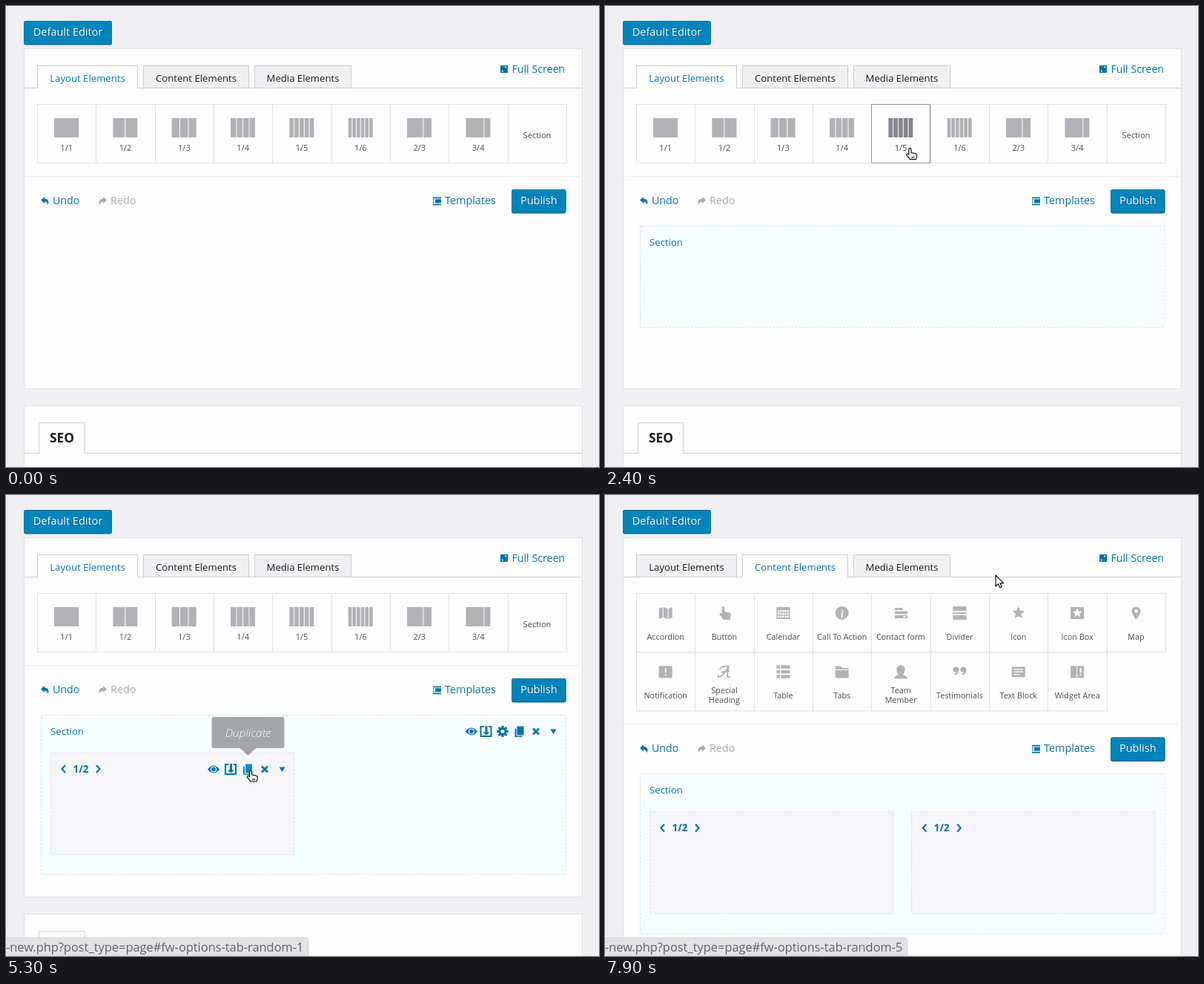
These frames come from a looping animation (800 px wide and 621 px high, 8000 ms). An HTML page:

```html
<!DOCTYPE html>
<html lang="en">
<head>
<meta charset="utf-8">
<title>Page builder</title>
<style>
  html, body { margin: 0; width: 100%; height: 100%; overflow: hidden; background: #f0eff1; }
  svg { display: block; width: 800px; height: 621px; font-family: "Open Sans", "Noto Sans", sans-serif; }
  .link { fill: #0073aa; }
  .mid { text-anchor: middle; }
  .button text { fill: #fff; text-anchor: middle; stroke: #006799; stroke-width: 1.6px; stroke-opacity: .7; paint-order: stroke; }
  .tile { --icon: #b2b1b4; --label: #4b4a4d; --hole: #fefdff; }
  .tile.on { --icon: #878688; --label: #333234; }
  .icon { fill: var(--icon); }
  .hole { fill: var(--hole); }
  .script { fill: none; stroke: var(--icon); stroke-width: 2px; }
  .label { fill: var(--label); text-anchor: middle; }
  .tab rect { fill: #f0eff1; stroke: #cbcacc; }
  .tab text { fill: #1b1a1c; }
  .tab path { stroke: none; }
  .tab.on rect { fill: #fefdff; }
  .tab.on text { fill: #0073aa; }
  .tab.on path { stroke: #fefdff; }
  .tip text { fill: #fff; font-style: italic; font-weight: 300; text-anchor: middle; }
  .dash { stroke: #d9dee1; stroke-dasharray: 3 2; }
</style>
</head>
<body>
<svg id="stage" viewBox="0 0 800 621"></svg>
<script>
const PANEL = '#fefdff', EDGE = '#e0dfe2', LOOP = 8000, STEP = 100, PITCH = 79.4;
const stage = document.getElementById('stage');

const rect = (x, y, w, h, attrs = '') => `<rect x="${x}" y="${y}" width="${w}" height="${h}" ${attrs}/>`;
const path = (d, attrs = '') => `<path d="${d}" ${attrs}/>`;
const text = (x, y, s, size, attrs = '') => `<text x="${x}" y="${y}" font-size="${size}" ${attrs}>${s}</text>`;
const group = (attrs, ...kids) => `<g ${attrs}>${kids.join('')}</g>`;
const at = (x, y, ...kids) => group(`transform="translate(${x} ${y})"`, ...kids);
const range = n => [...Array(n).keys()];

const STAR = range(10).map(i => {
  const r = i % 2 ? 4 : 9, a = i * Math.PI / 5;
  return `${i ? 'L' : 'M'}${(r * Math.sin(a)).toFixed(1)} ${(-r * Math.cos(a)).toFixed(1)}`;
}).join('') + 'z';
const HAND = 'M-1.6 1.6a1.6 1.6 0 0 1 3.2 0V6l5 .9q3 .6 2.7 3.1l-1 5h-8l-5-6q.2-2 2.1-1.4l1 .9z';
const ARROW = 'M0 0v15l3.5-3.3 2.2 5 2.5-1-2.2-4.9h4.7z';
const REPLY = 'M0 4.500L5 0v2.700q5.500 0 5.500 4.800 0 1.800-1.500 3.500 .3-4.600-4-4.600V9z';

const button = (x, y, w, s) => group('class="button"',
  rect(x, y, w, 32.5, 'rx="3" fill="#006799"'),
  rect(x + .5, y + .5, w - 1, 30.5, 'rx="2.500" fill="#0085ba" stroke="#0073aa"'),
  text(x + w / 2, y + 20, s, 14.5));

const tab = (id, x, w, s) => group(`id="${id}" class="tab"`,
  rect(x + .5, 80.5, w, 30), path(`M${x + 1} 110.5h${w - 1}`), text(x + w / 2 + .5, 101.5, s, 13.15, 'class="mid"'));

const tileX = i => Math.round(42 + 79.35 * i);
const frame = (i, y) => rect(tileX(i) + .5, y + .5, tileX(i + 1) - tileX(i), 79, `fill="none" stroke="${EDGE}"`);

// Column thumbnails, described by their relative widths
function layoutTile(parts, i) {
  const cx = 81.7 + 79.35 * i;
  if (!parts) return frame(i, 132) + text(cx, 177.5, 'Section', 11.1, 'class="label"');
  const sum = parts.reduce((a, b) => a + b), unit = (34 - parts.length) / sum;
  let left = cx - 16.7;
  const bars = parts.map(p => {
    const bar = rect(left.toFixed(2), 151, (p * unit).toFixed(2), 26, 'class="icon"');
    left += p * unit + 1;
    return bar;
  });
  const name = parts.length > 1 && parts[0] > 1 ? `${parts[0]}/${sum}` : `1/${sum}`;
  return frame(i, 132) + bars.join('') + text(cx, 194.5, name, 11.1, 'class="label"');
}
const layouts = [...range(6).map(n => Array(n + 1).fill(1)), [2, 1], [3, 1], null];

const rows = (x, w, h, ...ys) => ys.map(y => rect(x, y, w, h)).join('');
const hole = (...kids) => group('class="hole"', ...kids);
const quote = 'a4 4 0 1 1 8 0q0 6-6 7v-2q2.500-.5 3-2.300-5 1.300-5-2.700z';
const contents = [
  ['Accordion', path('M-9-6l5-2V6l-5 2zM-3-8l6 2V8l-6-2zM4-6l5-2V6l-5 2z')],
  ['Button', at(-1.5, -9, path(HAND, 'transform="scale(1.1 1.2)"'))],
  ['Calendar', rect(-9, -8, 18, 16) + hole(...range(15).map(i => rect(-7.5 + i % 5 * 3.2, -4 + (i / 5 | 0) * 3.8, 2.2, 2.6)))],
  ['Call To Action', '<circle r="9"/>' + hole(text(0, 5.5, 'i', 15, 'class="mid" font-family="Liberation Serif, serif" font-style="italic" font-weight="700"'))],
  ['Contact form', rows(-8, 10, 3, -7) + rows(-8, 17, 4, -2.5) + rows(-8, 17, 4, 3) + hole(rect(3, 4.2, 4, 1.5))],
  ['Divider', rows(-9, 18, 6, -9, 3) + rows(-9, 18, 2, -1)],
  ['Icon', path(STAR)],
  ['Icon Box', rect(-9, -8, 18, 16) + hole(path(STAR, 'transform="scale(.75)"'))],
  ['Map', path('M0 9Q-6 1-6-2.500a6 6 0 0 1 12 0Q6 1 0 9z') + hole('<circle cy="-2.5" r="2.4"/>')],
  ['Notification', rect(-9, -8, 18, 16) + hole(rect(-1, -5, 2, 6), rect(-1, 3, 2, 2))],
  ['Special Heading', path('M-8 4q-1 4 3 2 6-4 11-14-2 8-2 13 0 4 4 1M-4 1q5-3 11-2M-6-3q0-5 11-5', 'class="script"')],
  ['Table', rows(-9, 4.5, 4.5, -9, -2.5, 4) + rows(-3, 12, 4.5, -9, -2.5, 4)],
  ['Tabs', path('M-9-8h7l2 2.500h9v2H-9zM-9-2.500H9V8H-9z')],
  ['Team Member', path('M0-9c8 0 6 9 3 12 0 2 6 1.500 6 6H-9c0-4.500 6-4 6-6-3-3-5-12 3-12z')],
  ['Testimonials', path('M-9-3' + quote + 'M1-3' + quote)],
  ['Text Block', rect(-9, -7, 18, 14) + hole(rows(-6, 12, 1.3, -4, -.7), rows(-6, 8, 1.3, 2.6))],
  ['Widget Area', rect(-9, -8, 8, 16) + rect(0, -8, 9, 16) + hole(rect(3.3, -5, 2.4, 6), rect(3.3, 3, 2.4, 2))]
];
function contentTile([name, icon], i) {
  const row = i / 9 | 0, col = i % 9, y = 132 + row * PITCH, cx = 81.7 + 79.35 * col;
  const lines = i === 10 || i === 13 ? name.split(' ') : [name];
  return frame(col, y) + group('class="icon"', at(cx, y + 27, icon)) +
    lines.map((s, n) => text(cx, y + 62.5 + (lines.length > 1 ? n * 13 - 7 : 0), s, 10.8, 'class="label"')).join('');
}

// Controls in the headers of sections and columns
const tools = {
  eye: path('M-8 0Q0-10 8 0 0 10-8 0z') + '<circle r="4" fill="#f7fbfe"/><circle r="2.900"/>',
  load: path('M-2.500-6.500H-7v13H7v-13H3.500', 'fill="none" stroke="#0073aa" stroke-width="2"') + path('M-1-7.500h3v8.500h3L.5 5-4 1h3z'),
  gear: range(4).map(i => rect(-1.6, -7.5, 3.2, 15, `transform="rotate(${i * 45})"`)).join('') + '<circle r="5.500"/><circle r="2.500" fill="#f7fbfe"/>',
  copy: path('M-3-7H6V5H-3zM-6-4h2V6H4v1.500H-6z'),
  close: path('M-4-4L4 4M4-4L-4 4', 'stroke="#0073aa" stroke-width="2.600"'),
  caret: path('M-4-3H4L0 3.500z')
};
const toolbar = (id, y, places) => group(`id="${id}" class="link"`,
  ...Object.entries(places).map(([name, x]) => group(`class="${name}"`, at(x, y, tools[name]))));

const column = (id, x) => group(`id="${id}"`,
  rect(x + .5, 347.5, 328.5, 137, 'fill="#f6f5f7" class="dash"'),
  path(`M${x + 20} 364l-4.500 5 4.500 5M${x + 62} 364l4.500 5-4.500 5`, 'fill="none" stroke="#0073aa" stroke-width="2.200"'),
  text(x + 41, 374, '1/2', 13.5, 'class="link mid" font-weight="700"'));

const tip = (id, cx, y, w, s) => group(`id="${id}" class="tip"`,
  rect(cx - w / 2, y, w, 42, 'rx="3" fill="#2f2e30"'),
  path(`M${cx - 11} ${y + 42}h22l-11 10z`, 'fill="#2f2e30"'), text(cx, y + 27, s, 15.5));

stage.innerHTML = [
  button(24, 20, 119, 'Default Editor'),
  rect(24.5, 57.5, 753, 458, `id="panel" fill="${PANEL}" stroke="${EDGE}"`),
  path('M25 110.500H778', 'stroke="#cbcacc"'),
  tab('tabLayout', 42, 135, 'Layout Elements'),
  tab('tabContent', 185, 142, 'Content Elements'),
  tab('tabMedia', 335, 130, 'Media Elements'),
  at(667, 80, rect(0, 0, 10, 10, 'class="link"'), path('M2 6v2.500h2.500zM5.500 1.500H8V4z', `fill="${PANEL}"`)),
  text(682.5, 90, 'Full Screen', 14.2, 'class="link"'),
  group('id="layouts"', ...layouts.map((p, i) => group(`class="tile" id="tile${i}"`, layoutTile(p, i)))),
  group('id="contents" class="tile"', ...contents.map(contentTile)),
  rect(0, 132.5, 79, 79, 'id="halo" fill="none" stroke="#929193"'),
  group('id="work"',
    path('M25 229.500H778', 'stroke="#eeedf0"'),
    at(47, 257, path(REPLY, 'class="link"')), text(63, 267, 'Undo', 14.2, 'class="link"'),
    group('fill="#aaa9ab"', group('transform="translate(136 257) scale(-1 1)"', path(REPLY)), text(141, 267, 'Redo', 14.4)),
    group('class="link"', at(576, 257.5, rows(0, 11, 1.8, 0, 9), rows(0, 2, 1.5, 3, 6), rect(3, 2.8, 8, 5)),
      text(592, 267, 'Templates', 14.4)),
    button(682, 247, 73.5, 'Publish'),
    group('id="section"',
      rect(47.5, 296.5, 707.5, 136, 'id="box" fill="#f7fcff" class="dash"'),
      text(60, 323, 'Section', 13.2, 'class="link"'),
      toolbar('sectionTools', 318.5, { eye: 628, load: 647.5, gear: 670, copy: 692.5, close: 715, caret: 738.5 }),
      rect(59.5, 358.5, 705.5, 78, 'id="slot" fill="#000" fill-opacity=".03" class="dash"'),
      column('col1', 60), column('col2', 413.3),
      toolbar('colTools', 369.5, { eye: 280, load: 303, copy: 326, close: 349, caret: 372.5 }))),
  group('id="seo"',
    rect(24.5, 538.5, 753, 200, `fill="${PANEL}" stroke="${EDGE}"`),
    path('M25 602.500H45M106 602.500H778M44.500 603V561.500H106V603', 'fill="none" stroke="#cbcacc"'),
    text(75.5, 588, 'SEO', 17.3, 'class="mid" font-weight="700" fill="#1d1c1e"')),
  group('id="ghost" class="tile" opacity=".62"',
    rect(121.5, 132.5, 79, 79, `fill="${PANEL}"`), layoutTile([1, 1], 1)),
  tip('tipSection', 716.7, 70.5, 127, 'Add a Section'),
  tip('tipHalf', 161.3, 70.5, 154, 'Add a 1/2 column'),
  tip('tipCopy', 326.5, 299, 98, 'Duplicate'),
  group('id="status"', rect(-5, 596.5, 413, 30, 'id="bar" rx="4" fill="#e2e1e3" stroke="#d3d2d4"'),
    text(0, 614.5, '', 16.4, 'id="url" fill="#636264"')),
  group('id="cursor" fill="#fff" stroke="#111" stroke-width="1.200" stroke-linejoin="round"',
    path(HAND + 'M3 11v2.500M5.200 11v2.500', 'id="hand"'), path(ARROW, 'id="arrow"'))
].join('');

const el = {};
stage.querySelectorAll('[id]').forEach(node => el[node.id] = node);
const copyIcon = el.colTools.querySelector('.copy');

const show = (node, on) => node.style.display = on ? '' : 'none';
const move = (node, x, y) => node.setAttribute('transform', `translate(${x} ${y})`);
const clamp = v => Math.max(0, Math.min(1, v));
const fade = (t, from, to) => clamp(Math.min((t - from) / 240, (to - t) / 200));

// time, x, y of the pointer's hot spot
const route = [
  [100, 585, 400], [700, 721, 191], [1900, 721, 191], [2800, 190, 192], [3100, 178, 200], [3500, 178, 200],
  [4300, 157, 403], [4600, 157, 403], [5200, 330, 371], [5800, 330, 371], [6500, 278, 146],
  [6700, 258, 94], [7300, 258, 94], [7900, 527, 108]
];
function pointer(t) {
  const i = route.findIndex(p => p[0] >= t);
  if (i < 1) return route[0].slice(1);
  const [a, b] = [route[i - 1], route[i]], u = (t - a[0]) / (b[0] - a[0]), k = u * u * (3 - 2 * u);
  return [a[1] + (b[1] - a[1]) * k, a[2] + (b[2] - a[2]) * k];
}

function render(t) {
  const [x, y] = pointer(t);
  const dragging = t >= 3500 && t < 4600, dropped = t >= 4600, content = t >= 7100;
  const dy = content ? PITCH : 0, grow = (dropped ? 26 : 0) + dy;

  const overTiles = t >= 100 && !dragging && !content && y >= 132 && y < 212 && x >= 42 && x < 756;
  const hover = overTiles ? Math.floor((x - 42) / 79.35) : -1;
  layouts.forEach((_, i) => el['tile' + i].classList.toggle('on', i === hover));
  const dip = 13 * clamp(1 - Math.abs(t - 1600) / 200);
  move(el.tile8, 0, dip);
  show(el.halo, hover >= 0);
  if (hover >= 0) {
    el.halo.setAttribute('x', tileX(hover) + .5);
    move(el.halo, 0, hover === 8 ? dip : 0);
  }

  el.tabLayout.classList.toggle('on', !content);
  el.tabContent.classList.toggle('on', content);
  show(el.layouts, !content);
  show(el.contents, content);
  move(el.work, 0, dy);
  move(el.seo, 0, grow);
  el.panel.setAttribute('height', 458 + grow);

  const overSlot = dragging && y > 296;
  show(el.section, t >= 1500);
  el.box.setAttribute('height', dropped ? 215 : overSlot ? 172 : 136.5);
  show(el.slot, overSlot);
  show(el.col1, dropped);
  show(el.col2, t >= 5700);
  const inColumn = dropped && y > 347 && x < 389;
  show(el.sectionTools, dropped && y > 296);
  show(el.colTools, inColumn);
  const onCopy = inColumn && x > 318 && x < 336 && y < 379;
  copyIcon.style.fill = onCopy ? '#008fcc' : '';

  show(el.ghost, dragging);
  move(el.ghost, x - 178, y - 200);

  el.tipSection.style.opacity = fade(t, 600, 2100);
  el.tipHalf.style.opacity = fade(t, 2860, 3500);
  el.tipCopy.style.opacity = fade(t, 5200, 6000);

  const short = t < 3600;
  show(el.status, t >= 2900);
  el.bar.setAttribute('width', short ? 269 : 413);
  el.url.textContent = '-new.php?post_type=page#fw-' + (short ? '…' : 'options-tab-random-' + (t >= 6700 ? 5 : 1));

  const onTab = y > 80 && y < 110 && x > 185 && x < 328;
  const hand = overTiles || dragging || onTab || onCopy;
  show(el.cursor, t >= 100);
  show(el.hand, hand);
  show(el.arrow, !hand);
  move(el.cursor, x, y);
}

const start = performance.now();
function tick() {
  const t = (performance.now() - start) % LOOP;
  render(Math.floor(t / STEP) * STEP);
  requestAnimationFrame(tick);
}
tick();
</script>
</body>
</html>
```
